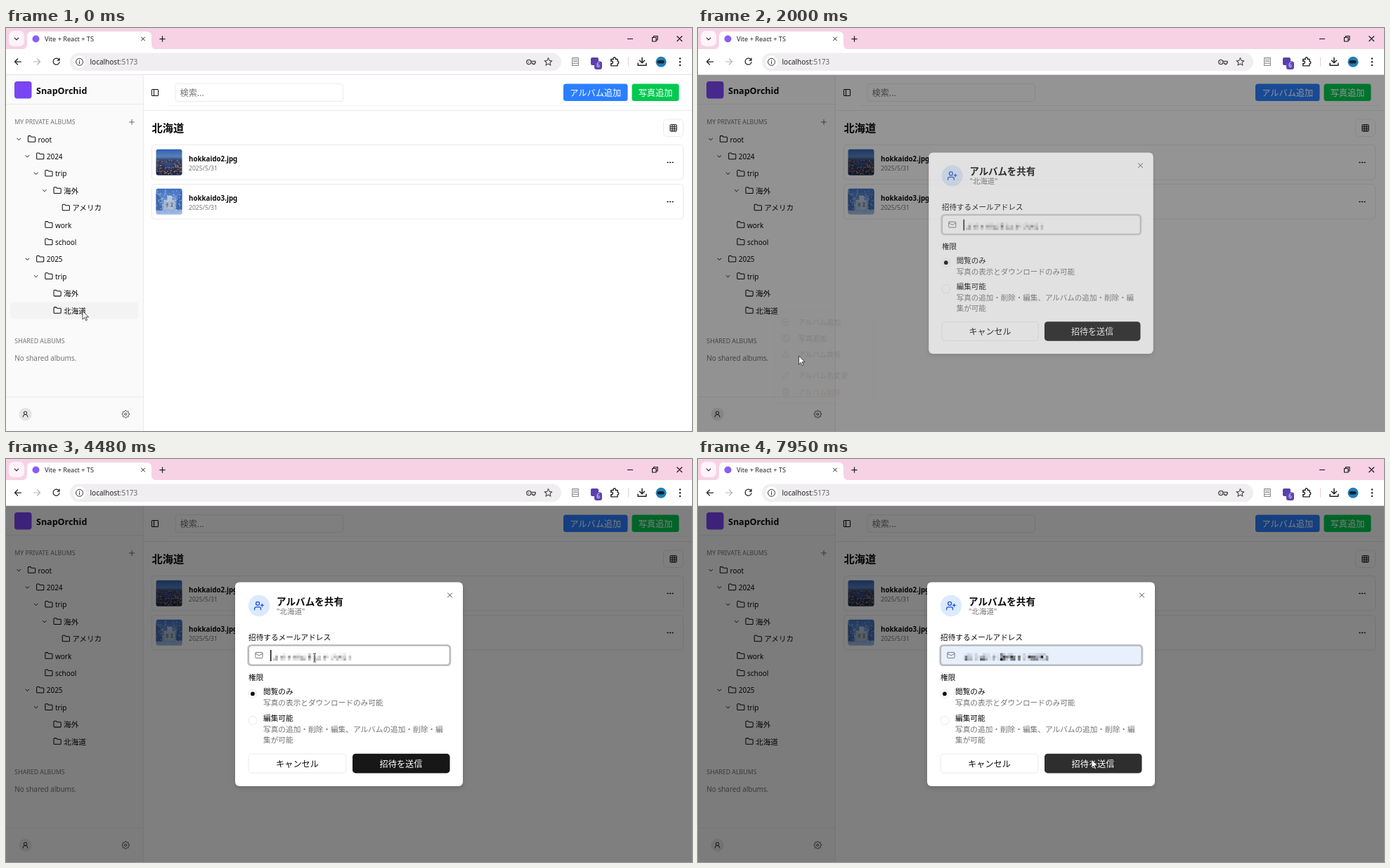
An HTML page that plays this animation: 976x574 px, repeating every 8 s.

```html
<!DOCTYPE html>
<html lang="ja">
<head>
<meta charset="utf-8">
<title>Album sharing</title>
<style>
  html, body { margin: 0; width: 100%; height: 100%; overflow: hidden; background: #fff; }
  svg { display: block; width: 100vw; height: 100vh; }
  text { font-family: "Noto Sans", "Noto Sans CJK JP", sans-serif; white-space: pre; }
  #menu { transform-origin: 110px 404px; filter: drop-shadow(0 2px 2px #0002); }
  #dialog { transform-origin: 488px 320.7px; filter: drop-shadow(0 3px 3px #0002); }
</style>
</head>
<body>
<svg id="stage" viewBox="0 0 976 574"></svg>
<script>
const LOOP = 8000;
const INK = '#0a0a0a', MUTED = '#737373', LINE = '#e5e5e5';

const ICON = {
  folder: 'M20 20a2 2 0 0 0 2-2V8a2 2 0 0 0-2-2h-7.9a2 2 0 0 1-1.7-.9L9.6 3.9A2 2 0 0 0 7.9 3H4a2 2 0 0 0-2 2v13a2 2 0 0 0 2 2Z',
  down: 'M6 9l6 6 6-6',
  plus: 'M5 12h14M12 5v14',
  close: 'M18 6L6 18M6 6l12 12',
  panel: 'M5 3h14a2 2 0 0 1 2 2v14a2 2 0 0 1-2 2H5a2 2 0 0 1-2-2V5a2 2 0 0 1 2-2ZM9 3v18',
  table: 'M5 3h14a2 2 0 0 1 2 2v14a2 2 0 0 1-2 2H5a2 2 0 0 1-2-2V5a2 2 0 0 1 2-2ZM3 9h18M3 15h18M9 3v18M15 3v18',
  dots: 'M4 12h2M11 12h2M18 12h2',
  user: 'M7 8a5 5 0 1 0 10 0a5 5 0 1 0-10 0M20 21a8 8 0 0 0-16 0',
  invite: 'M5 7a4 4 0 1 0 8 0a4 4 0 1 0-8 0M2 21v-2a4 4 0 0 1 4-4h6a4 4 0 0 1 4 4v2M19 8v6M22 11h-6',
  mail: 'M4 4h16a2 2 0 0 1 2 2v12a2 2 0 0 1-2 2H4a2 2 0 0 1-2-2V6a2 2 0 0 1 2-2ZM22 7l-10 6L2 7',
  add: 'M2 12a10 10 0 1 0 20 0a10 10 0 1 0-20 0M8 12h8M12 8v8',
  image: 'M3 3h18v18H3ZM7 9a2 2 0 1 0 4 0a2 2 0 1 0-4 0M21 15l-4-4L6 21',
  share: 'M4 12v8h16v-8M16 6l-4-4-4 4M12 2v13',
  pencil: 'M17 3a2.8 2.8 0 1 1 4 4L7.5 20.5 2 22l1.5-5.5ZM15 5l4 4',
  trash: 'M3 6h18M19 6v16H5V6M8 6V2h8v4M10 11v6M14 11v6',
  back: 'M21 12H3M11 4l-8 8 8 8',
  forward: 'M3 12h18M13 4l8 8-8 8',
  reload: 'M20 7a9 9 0 1 0 1 6M21 2v6h-6',
  info: 'M2 12a10 10 0 1 0 20 0a10 10 0 1 0-20 0M12 11v6M12 7v1',
  key: 'M2 12a5 5 0 1 0 10 0a5 5 0 1 0-10 0M6 12h1M12 10h10v4h-2v3h-4v-3h-4',
  star: 'M12 2l3 7 7 .6-5.3 4.7 1.6 7.2-6.3-4-6.3 4 1.6-7.2L2 9.6 9 9Z',
  page: 'M4 2h16v20H4ZM7 7h10M7 11h10M4 16h16',
  puzzle: 'M3 6h6a3 3 0 1 1 5 0h5v5a3 3 0 1 1 0 6v5H3v-6a3 3 0 1 0 0-5Z',
  download: 'M12 2v13M6 9l6 6 6-6M2 16v5h20v-5',
  gear: gearPath()
};

function gearPath() {
  let d = '';
  for (let i = 0; i < 64; i++) {
    const a = i / 64 * Math.PI * 2, r = 9.2 + 1.4 * Math.tanh(3 * Math.cos(8 * a));
    d += `${i ? 'L' : 'M'}${(12 + r * Math.cos(a)).toFixed(1)} ${(12 + r * Math.sin(a)).toFixed(1)}`;
  }
  return d + 'ZM9 12a3 3 0 1 0 6 0a3 3 0 1 0-6 0';
}

function random(seed) {
  return () => (seed = (seed * 16807) % 2147483647) / 2147483647;
}

const text = (x, cy, size, str, fill = INK, weight = 400, anchor = 'start') =>
  `<text x="${x}" y="${cy + size * .37}" font-size="${size}" fill="${fill}" font-weight="${weight}" text-anchor="${anchor}">${str}</text>`;
const rect = (x, y, w, h, fill, r = 0, more = '') =>
  `<rect x="${x}" y="${y}" width="${w}" height="${h}" rx="${r}" fill="${fill}" ${more}/>`;
const frame = (x, y, w, h, r, fill = 'none', stroke = LINE) =>
  rect(x, y, w, h, fill, r, `stroke="${stroke}" stroke-width=".8"`);
const circle = (x, y, r, fill) => `<circle cx="${x}" cy="${y}" r="${r}" fill="${fill}"/>`;
const icon = (name, cx, cy, size = 12.2, color = INK, width = 2) =>
  `<path d="${ICON[name]}" transform="translate(${cx - size / 2} ${cy - size / 2}) scale(${size / 24})"
    fill="none" stroke="${color}" stroke-width="${width}" stroke-linecap="round" stroke-linejoin="round"/>`;
const path = (d, stroke = LINE, width = .8, fill = 'none') =>
  `<path d="${d}" stroke="${stroke}" stroke-width="${width}" fill="${fill}"/>`;

function browserBar() {
  return rect(0, 0, 976, 31, '#f6d2e4') + rect(0, 30, 976, 36, '#fff') +
    rect(4, 4, 22, 22, '#fdf3f8', 7) + icon('down', 15, 15.5, 11, '#222', 2.4) +
    path('M23 30.5Q30 30 30 23V12Q30 5 37 5H200Q207 5 207 12V23Q207 30 214 30.5Z', 'none', 0, '#fff') +
    circle(42.5, 15.5, 5, '#8b5cf6') + text(55, 16, 9.15, 'Vite + React + TS', '#222') +
    icon('close', 195, 15.5, 10, '#222', 2.4) + icon('plus', 222.5, 15.5, 12.5, '#222', 2.4) +
    path('M884 15.5h8M954.5 11.5l7.5 7.5M962 11.5l-7.5 7.5M919.5 13.5h5.5v5.5h-5.5ZM921.5 13v-1.5h5.5v5.5h-1.5', '#111', 1.1) +
    icon('back', 17, 48, 12, '#222', 2.5) + icon('forward', 44, 48, 12, '#b5b5b5', 2.4) +
    icon('reload', 71.5, 48, 12, '#222', 2.5) +
    rect(91, 35.5, 699, 25.5, '#f0eef0', 12.7) + circle(104.5, 48.3, 9, '#fff') +
    icon('info', 104.5, 48.3, 12, '#333') +
    `<text x="119.5" y="52" font-size="10" fill="#222">localhost<tspan fill="#666">:5173</tspan></text>` +
    icon('key', 747, 48.5, 15, '#444') + icon('star', 771.5, 48, 13, '#444') +
    icon('page', 810, 48, 13, '#888') + rect(832, 42, 11, 11, '#5b3fa8', 2) +
    rect(837, 47.5, 11, 11.5, '#5e45b5', 3) + text(842.5, 53.4, 8, '6', '#fff', 400, 'middle') +
    icon('puzzle', 866, 48, 14, '#222', 2.4) + path('M885.5 41.5v13', '#f0c6dc', 1) +
    icon('download', 905, 48, 14, '#222', 2.6) + circle(932, 48.3, 7.5, '#1f7fb8') +
    rect(926.5, 46, 10, 4.5, '#14222e', 2) +
    [43.5, 48.3, 53].map(y => circle(959, y, 1.2, '#222')).join('') + path('M0 66.3H976', '#e3dfe2', 1);
}

function sidebar() {
  // depth, name, has children
  const tree = [[0, 'root', 1], [1, '2024', 1], [2, 'trip', 1], [3, '海外', 1], [4, 'アメリカ'], [2, 'work'],
    [2, 'school'], [1, '2025', 1], [2, 'trip', 1], [3, '海外'], [3, '北海道']];
  return rect(0, 66.5, 195, 508, '#fafafa') + path('M195.4 66.5V574M0 108.5H195M0 525.5H195') +
    rect(12, 76, 24.5, 24.5, '#7a45f3', 4) + text(43, 89, 12.5, 'SnapOrchid', INK, 600) +
    text(12.3, 134, 8.8, 'MY PRIVATE ALBUMS', MUTED, 500) + icon('plus', 179, 134, 12.2, '#555', 1.7) +
    rect(6, 390.5, 182.5, 24, '#f3f3f4', 4.5, 'id="rowHover"') +
    tree.map(([depth, name, open], i) => {
      const x = 36.5 + depth * 12.2, y = 158.5 + i * 24.4;
      return (open ? icon('down', x - 18.3, y, 9.5, INK, 2.4) : '') + icon('folder', x, y - .3) +
        text(x + 9, y + .3, name.charCodeAt(0) > 255 ? 10.6 : 10, name);
    }).join('') +
    text(12.3, 445.5, 8.8, 'SHARED ALBUMS', MUTED, 500) + text(12.3, 470.5, 9.95, 'No shared albums.', MUTED) +
    circle(27.5, 550, 9.2, '#e5e5e5') + icon('user', 27.5, 550, 10.5) + icon('gear', 170.3, 550, 12.2, '#444', 1.9);
}

function nightPhoto(x, y) {
  const rnd = random(11);
  let s = rect(x, y, 37, 37, 'url(#dusk)', 3);
  for (let i = 0; i < 130; i++)
    s += rect(x + 1 + rnd() * 34, y + 15 + rnd() * 20, 1.5, 1.1, ['#d48a48', '#9a5a3a', '#e8b876', '#3f5c96'][i % 4], 0, 'opacity=".8"');
  return s + rect(x + 11, y + 18, 13, 7, '#2b4a86', 3, 'opacity=".8"');
}

function snowPhoto(x, y) {
  const rnd = random(5);
  let s = rect(x, y, 37, 37, 'url(#snow)', 3) +
    path(`M${x} ${y + 6}l7 8 2 17h-9ZM${x + 37} ${y + 3}l-7 10-2 17h9Z`, 'none', 0, '#3f68ab') +
    rect(x + 11, y + 16, 16, 14, '#a9b8cd', 1) + rect(x + 16, y + 10, 7, 8, '#b9c6d8', 1) +
    rect(x + 14, y + 20, 3, 6, '#6b809f') + rect(x + 21, y + 20, 3, 6, '#6b809f');
  for (let i = 0; i < 70; i++) s += circle(x + 1 + rnd() * 35, y + 1 + rnd() * 35, .6, '#d5e3f7');
  return s;
}

function mainPane() {
  const row = (y, name, photo) => frame(207.5, y, 756, 49.5, 4) + photo(213.5, y + 6.3) +
    text(260, y + 19.8, 9.75, name, INK, 600) + text(260, y + 33, 8.65, '2025/5/31', MUTED) +
    icon('dots', 945, y + 25, 12.2, INK, 2.6);
  return rect(195.8, 66.5, 781, 508, '#fff') + path('M195.8 117.5H976') + path('M229 110.5H969', '#f0f0f0') +
    icon('panel', 212, 92) + frame(241, 79.5, 238.5, 25, 3.5) + text(247.5, 92, 12.2, '検索...', MUTED) +
    rect(793, 79.5, 91.5, 24.5, '#2b7fff', 3.5) + text(838.7, 92, 12.2, 'アルバム追加', '#fff', 400, 'middle') +
    rect(890.5, 79.5, 67, 24.5, '#00c950', 3.5) + text(924, 92, 12.2, '写真追加', '#fff', 400, 'middle') +
    text(207.5, 142.5, 15.24, '北海道', INK, 700) + frame(935.5, 130, 28, 24.5, 5) + icon('table', 949.5, 142.3) +
    row(166.5, 'hokkaido2.jpg', nightPhoto) + row(222.5, 'hokkaido3.jpg', snowPhoto);
}

function contextMenu() {
  const items = [[420, 'add', 'アルバム追加'], [444, 'image', '写真追加'], [468.5, 'share', 'アルバム共有'],
    [499.5, 'pencil', 'アルバム名変更'], [524, 'trash', 'アルバム削除']];
  return frame(110, 404, 145, 135, 4.5, '#fff') + path('M110.5 483.5H254.5') +
    items.map(([y, name, label]) => icon(name, 125.5, y - .5, 12.2, MUTED, 1.9) +
      text(144, y, 10.6, label, name === 'trash' ? '#c2410c' : '#262626')).join('');
}

function mosaic(id, seed, width, color, strength) {
  const rnd = random(seed), cell = 3.6;
  let s = '';
  for (let x = 0; x < width; x += cell) {
    const at = Math.abs(x - 52) < 5 ? .35 : 0, gap = rnd() < .25 ? .1 : 1;
    [.22, 1, .75].forEach((weight, row) => {
      const a = Math.min(1, (rnd() * weight + at) * gap * strength);
      s += rect(376 + x, 276.5 + row * cell, cell, cell, color, 0, `opacity="${a.toFixed(2)}"`);
    });
  }
  return `<g id="${id}">${s}</g>`;
}

function shareDialog() {
  return rect(326, 175.5, 324, 290.5, '#fff', 6) +
    circle(360, 209, 15.2, '#dbeafe') + icon('invite', 360, 209, 15.24, '#1d4ed8') +
    text(385, 202.5, 13.6, 'アルバムを共有', INK, 700) + text(385, 217, 10.6, '"北海道"', MUTED) +
    icon('close', 631.5, 194, 12.2, '#444', 1.9) +
    text(345, 254.5, 10.65, '招待するメールアドレス', INK, 500) +
    rect(343.3, 264, 290, 31, '#c4c4c4', 5.5, 'id="ring"') +
    rect(345.5, 266, 285.6, 27, '#fff', 4, 'id="field" stroke="#a1a1a1" stroke-width=".8"') +
    icon('mail', 360, 279.5, 12.2, '#777', 1.9) +
    `<g id="hint">${text(377, 281, 10.8, 'sample@inbox.test', MUTED)}</g>` +
    mosaic('blank', 23, 112, '#555', .6) + mosaic('preview', 71, 104, '#222', 1) + mosaic('filled', 97, 120, '#222', 1) +
    rect(376, 272, 1.5, 16, '#111', 0, 'id="caret"') +
    text(345, 311, 10.65, '権限', INK, 500) +
    frame(344.8, 328.3, 12.2, 12.2, 6.1) + circle(350.9, 334.4, 2.9, INK) +
    text(366, 331, 10.65, '閲覧のみ', INK, 500) + text(366, 347, 10.67, '写真の表示とダウンロードのみ可能', MUTED) +
    frame(344.8, 366.3, 12.2, 12.2, 6.1) +
    text(366, 369, 10.65, '編集可能', INK, 500) +
    text(366, 385, 10.67, '写真の追加・削除・編集、アルバムの追加・削除・編', MUTED) + text(366, 400.5, 10.67, '集が可能', MUTED) +
    frame(345, 420, 139, 27.2, 4.5, '#fff') + text(414.5, 434, 12.2, 'キャンセル', INK, 400, 'middle') +
    rect(493, 419.7, 138.5, 27.7, '#171717', 4.5, 'id="send"') + text(562, 434, 12.2, '招待を送信', '#fff', 400, 'middle');
}

const gradient = (id, stops) => `<linearGradient id="${id}" x2="0" y2="1">` +
  stops.map(([o, c]) => `<stop offset="${o}" stop-color="${c}"/>`).join('') + '</linearGradient>';

const pointers =
  `<g id="arrow">${path('M0 0V12l2.8-2.6 1.9 4.3 1.8-.8-1.9-4.2h3.9Z', '#222', .8, '#fff')}</g>` +
  `<g id="hand">${path('M-1.2 1Q0-1 1.2 1V5.5l4 1q1.5.5 1.3 2.5l-1 5.5h-5.5l-4-5.5q0-1.7 2.8-.2Z', '#222', .8, '#fff')}</g>` +
  `<g id="beam">${path('M-2-6h1.5L0-5.5.5-6H2M0-5.5v11M-2 6h1.5L0 5.5.5 6H2', '#222', .9)}</g>`;

document.getElementById('stage').innerHTML =
  `<defs>${gradient('dusk', [[0, '#2c62b4'], [.28, '#5a7fb8'], [.42, '#33416a'], [1, '#1c2340']])}
  ${gradient('snow', [[0, '#4070c0'], [.6, '#6f98d4'], [1, '#a3bde2']])}</defs>` +
  mainPane() + sidebar() + `<g id="menu">${contextMenu()}</g>` +
  rect(0, 66.5, 976, 508, '#000', 0, 'id="overlay"') +
  `<g id="dialog">${shareDialog()}</g>` + browserBar() + `<g id="pointer">${pointers}</g>`;

// Stepped values: [time, value], each held until the next.
const MENU = [[0, 0], [520, .1], [590, .7], [660, .93], [730, 1], [1930, .97], [2000, .13], [2070, 0]];
const DIALOG = [[0, 0], [1930, .09], [2000, .72], [2070, .94], [2140, 1]];
const OVERLAY = [[0, 0], [1930, .06], [2000, .42], [2070, .48], [2140, .5]];
const CARET = [[0, 1], [2470, 0], [2900, 1], [3540, 0], [4000, 1], [4550, 0], [5010, 1], [5340, 0]];
const TEXT = [[0, 'hint'], [2000, 'blank'], [5340, 'preview'], [5810, 'filled']];
const SHAPE = [[0, 'arrow'], [2470, 'hand'], [4200, 'beam'], [5040, 'arrow']];
// Pointer moves: start, end, x, y
const MOVES = [[0, 0, 109, 403], [1260, 1330, 143.5, 467], [2340, 2470, 418, 328],
  [4000, 4550, 440, 281], [5010, 5080, 457, 305], [7680, 7950, 560, 428]];

const held = (steps, t) => steps.reduce((value, [time, next]) => t >= time ? next : value, steps[0][1]);

function pointerAt(t) {
  let x = 0, y = 0;
  for (const [start, end, nx, ny] of MOVES) {
    if (t < start) break;
    const p = end > start ? Math.min(1, (t - start) / (end - start)) : 1, e = p * p * (3 - 2 * p);
    x += (nx - x) * e;
    y += (ny - y) * e;
  }
  return [x, y];
}

const el = id => document.getElementById(id);
const show = (id, on) => { el(id).style.display = on ? '' : 'none'; };

function draw() {
  const t = performance.now() % LOOP;
  const dialog = held(DIALOG, t), [x, y] = pointerAt(t);
  show('rowHover', t < 520);
  for (const [id, p] of [['menu', held(MENU, t)], ['dialog', dialog]]) {
    show(id, p > 0);
    el(id).style.opacity = p;
    el(id).style.transform = `scale(${.95 + .05 * p})`;
  }
  el('overlay').style.opacity = held(OVERLAY, t);
  el('ring').style.opacity = dialog;
  el('field').style.strokeOpacity = dialog;
  for (const id of ['hint', 'blank', 'preview', 'filled']) show(id, held(TEXT, t) === id);
  show('caret', held(CARET, t));
  el('field').setAttribute('fill', t < 5340 ? '#fff' : '#e8f0fe');
  el('send').setAttribute('fill', x > 493 && y > 419 ? '#2e2e2e' : '#171717');
  for (const id of ['arrow', 'hand', 'beam']) show(id, held(SHAPE, t) === id);
  el('pointer').setAttribute('transform', `translate(${x} ${y})`);
  requestAnimationFrame(draw);
}
draw();
</script>
</body>
</html>
```
